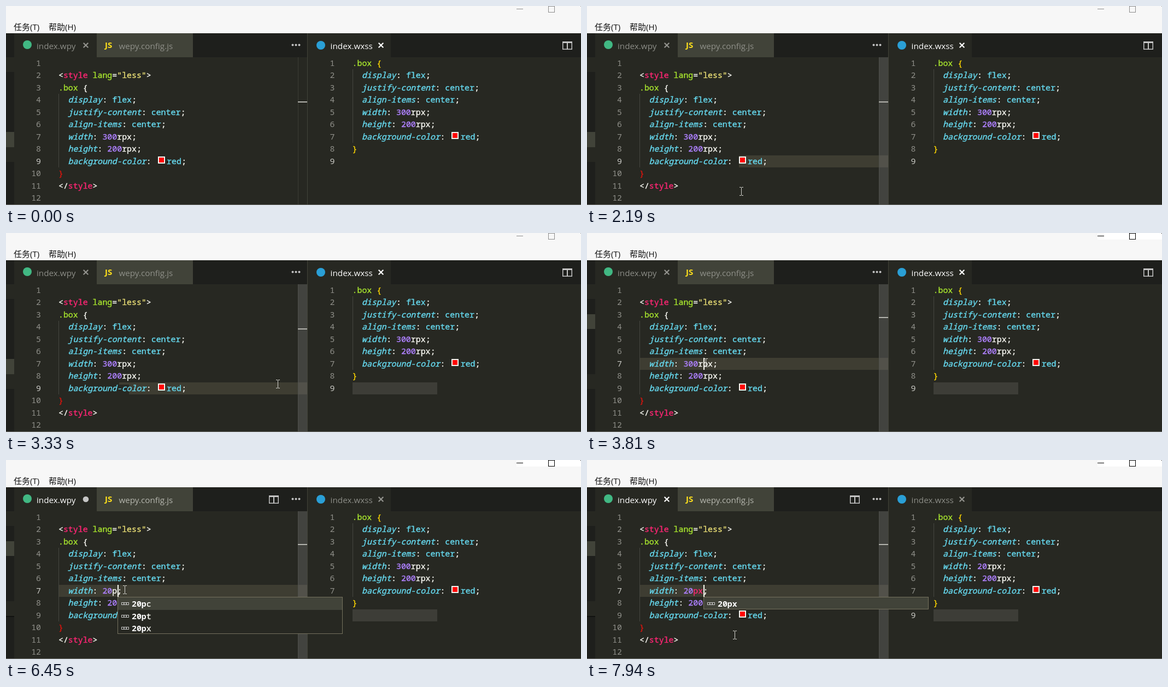
An HTML page with a canvas that plays this animation: 1052 by 365 pixels, repeating every 8000 ms.

```html
<!DOCTYPE html>
<html lang="zh">
<head>
<meta charset="utf-8">
<title>Editor</title>
<style>
html, body { margin: 0; width: 100%; height: 100%; overflow: hidden; background: #272822; }
canvas { display: block; }
</style>
</head>
<body>
<canvas id="stage" width="1052" height="365"></canvas>
<script>
const ctx = document.getElementById('stage').getContext('2d');
const LOOP = 8000;
const PITCH = 8.935, LINE = 22.5, FIRST = 105;
const LEFT = 96, RIGHT = 633.6;
const MONO = '14.89px "Noto Sans Mono", monospace';
const UI = '15.25px "Open Sans", "Noto Sans CJK SC", sans-serif';
const MENU = '15px "Open Sans", "Noto Sans CJK SC", sans-serif';
const BG = '#272822', DARK = '#1e1f1c', TAB = '#414339', HILITE = '#3e3d32';

// w plain, i property, c value, n number, p tag, g selector, y string, o brace, r bad brace
const COLORS = { w: '#f8f8f2', i: '#66d9ef', c: '#66d9ef', n: '#ae81ff', p: '#f92672',
  g: '#a6e22e', y: '#e6db74', o: '#ffd700', r: '#d8150f' };

const decl = (name, ...value) => ['w  ', 'i' + name, 'w: ', ...value, 'w;'];
const rules = (width, unit) => [
  decl('display', 'cflex'),
  decl('justify-content', 'ccenter'),
  decl('align-items', 'ccenter'),
  decl('width', 'n' + width, unit),
  decl('height', 'n200', 'wrpx'),
  decl('background-color', '#', 'cred')
];
const leftCode = (width, unit) => [
  [],
  ['w<', 'pstyle', 'w ', 'glang', 'w=', 'y"less"', 'w>'],
  ['g.box', 'w {'],
  ...rules(width, unit),
  ['r}'],
  ['w</', 'pstyle', 'w>'],
  []
];
const rightCode = width => [['g.box', 'o {'], ...rules(width, 'wrpx'), ['o}'], []];

const pointerPath = [
  [2070, 330, 345], [2190, 282, 340], [2330, 215, 288], [2430, 142, 260],
  [2560, 320, 285], [2700, 600, 285], [2870, 770, 194], [2990, 782, 284],
  [3200, 640, 300], [3420, 400, 262], [3640, 217, 238], [7410, 217, 238],
  [7560, 212, 262], [7740, 240, 300], [7940, 270, 321]
];

function rect(x, y, w, h, color) {
  ctx.fillStyle = color;
  ctx.fillRect(x, y, w, h);
}

function text(str, x, y, color, font = UI, align = 'left') {
  ctx.font = font;
  ctx.textAlign = align;
  ctx.fillStyle = color;
  ctx.fillText(str, x, y);
}

// A thin outline gives the code its medium weight.
function codeText(str, x, y, color, style = '') {
  text(str, x, y, color, style + MONO);
  ctx.strokeStyle = color;
  ctx.lineWidth = .4;
  ctx.strokeText(str, x, y);
}

function disc(x, y, r, color) {
  ctx.fillStyle = color;
  ctx.beginPath();
  ctx.arc(x, y, r, 0, 7);
  ctx.fill();
}

function cross(x, y, color) {
  ctx.strokeStyle = color;
  ctx.lineWidth = 2.2;
  ctx.beginPath();
  ctx.moveTo(x - 4.3, y - 4.3); ctx.lineTo(x + 4.3, y + 4.3);
  ctx.moveTo(x + 4.3, y - 4.3); ctx.lineTo(x - 4.3, y + 4.3);
  ctx.stroke();
}

function splitIcon(x) {
  ctx.strokeStyle = '#c5c5c5';
  ctx.lineWidth = 1.5;
  ctx.strokeRect(x + .75, 65.75, 16.5, 13.5);
  rect(x, 65, 18, 3, '#c5c5c5');
  rect(x + 8, 66, 2, 13, '#c5c5c5');
}

const lineTop = n => Math.round(FIRST + (n - 1) * LINE - LINE / 2);
const highlight = (n, x, end, color = HILITE) => rect(x, lineTop(n), end - x, 22, color);

function drawCode(lines, x0, gutter, active) {
  lines.forEach((tokens, row) => {
    const mid = FIRST + row * LINE, base = Math.round(mid + 4.8);
    text(row + 1, gutter, base, row + 1 === active ? '#c9c9c4' : '#90908a', MONO, 'right');
    let x = x0;
    for (const token of tokens) {
      const kind = token[0], str = token.slice(1);
      if (kind === '#') {
        const sx = Math.round(x + 3), sy = Math.round(mid) - 9;
        rect(sx, sy, 13, 13, '#f4f4ee');
        rect(sx + 2, sy + 2, 9, 9, '#ff0000');
        x += 19.4;
        continue;
      }
      const italic = kind === 'i';
      codeText(str, italic ? x - .4 : x, base, COLORS[kind], italic ? 'italic ' : '');
      x += str.length * PITCH;
    }
  });
}

function drawWindow(t) {
  const focused = t >= 3730;
  rect(0, 0, 1052, 50, '#f7f7f7');
  if (focused) rect(934, 0, 118, 12, '#fff');
  const ink = focused ? '#000' : '#8c8c8c';
  rect(934, 5, 12, 1, ink);
  ctx.strokeStyle = ink;
  ctx.lineWidth = 1;
  ctx.strokeRect(992.5, .5, 11, 11);
  rect(1051, 0, 1, 1, ink);
  text('任务(T)', 14, 44, '#111', MENU);
  text('帮助(H)', 78, 44, '#111', MENU);
}

function drawSidebar(t) {
  rect(0, 50, 15, 315, DARK);
  rect(0, 94, 15, 27, BG);
  rect(0, 259, 15, 27, BG);
  rect(0, t < 3810 ? 231 : 149, 15, t < 3810 ? 28 : 27, TAB);
  if (t >= 3840) rect(0, 286, 15, 2, '#111210');
}

function drawTabs(t) {
  const leftActive = t >= 3840;
  const unsaved = t >= 5310 && t < 7220;
  const bright = '#fff', dim = '#8c8d87';
  rect(15, 50, 1037, 44, DARK);
  rect(15, 50, 151, 44, BG);
  rect(166, 50, 176, 44, TAB);
  rect(552, 50, 152, 44, BG);

  disc(39, 71, 8, '#41b883');
  text('index.wpy', 56, 79, leftActive ? bright : dim);
  if (unsaved) disc(146, 72, 5.3, '#c5c5c5');
  else cross(146, 72, leftActive ? bright : '#92928d');
  text('JS', 181, 77, '#ffe01b', 'bold 15px "Open Sans", sans-serif');
  text('wepy.config.js', 206.4, 79, leftActive ? '#b5b6ae' : '#8f9089');
  for (const x of [524.5, 530.5, 536.5]) disc(x, 71.5, 2, '#c5c5c5');

  disc(576, 72, 8, '#2a9fd6');
  text('index.wxss', 593.6, 79, leftActive ? dim : bright);
  cross(686, 72, leftActive ? '#92928d' : bright);
  splitIcon(leftActive ? 481 : 1018);
}

function leftWidth(t) {
  if (t < 5310) return ['300', 'wrpx'];
  if (t < 5390) return ['2', 'w'];
  if (t < 6420) return ['20', 'w'];
  return t < 6540 ? ['20', 'wp'] : ['20', 'ppx'];
}

function drawCaret(t) {
  const off = [[4570, 5060], [5960, 6420], [7040, 7540]];
  if (t < 3810 || off.some(([a, b]) => t >= a && t < b)) return;
  const col = t < 3990 ? 13 : t < 5310 ? 15 : t < 5390 ? 10 : t < 6420 ? 11 : t < 6540 ? 12 : 13;
  rect(Math.round(LEFT + .4 + col * PITCH), 229, 2, 22, '#f8f8f0');
}

function drawRuler(t, selected) {
  rect(534, 94, 1, 270, '#3b3c35');
  const shown = Math.min(1, Math.max(0, Math.ceil((t - 1029) / 57) / 4));
  rect(534, 94, 17, 270, `rgba(121,121,121,${.33 * shown})`);
  rect(534, t < 3810 ? 175 : 154, 17, 2, '#b4b4ae');
  if (selected) rect(539, 156, 7, 9, '#a0a09b');
  rect(551, 50, 1, 314, '#414339');
}

function drawPopup(t) {
  if (t < 6450) return;
  const narrowed = t >= 6570;
  const x = narrowed ? 213 : 204;
  const items = narrowed ? ['20px'] : ['20pc', '20pt', '20px'];
  const matched = narrowed ? 4 : 3;
  const h = narrowed ? 23 : 68;
  rect(x, 251, 412, h, '#75715e');
  rect(x + 1, 252, 410, h - 2, BG);
  rect(x + 1, 252, 410, narrowed ? 21 : 23, TAB);
  items.forEach((item, i) => {
    const mid = 264 + i * LINE, base = Math.round(mid + 5);
    ctx.strokeStyle = '#c5c5c5';
    ctx.lineWidth = 1;
    for (let k = 0; k < 3; k++) ctx.strokeRect(x + 7.5 + k * 4.5, Math.round(mid) - 2.5, 4, 4);
    text(item.slice(0, matched), x + 26, base, '#fff', 'bold ' + MONO);
    codeText(item.slice(matched), x + 26 + matched * PITCH, base, '#f8f8f2');
  });
}

function drawPointer(t) {
  if (t < pointerPath[0][0]) return;
  let i = pointerPath.findIndex(p => p[0] > t);
  if (i < 0) i = pointerPath.length;
  const a = pointerPath[i - 1], b = pointerPath[i] || a;
  const k = a === b ? 0 : (t - a[0]) / (b[0] - a[0]);
  const x = Math.round(a[1] + (b[1] - a[1]) * k);
  const y = Math.round(a[2] + (b[2] - a[2]) * k);
  const color = '#d6d6d0';
  rect(x, y - 7, 1, 14, color);
  for (const edge of [y - 8, y + 7]) {
    rect(x - 3, edge, 3, 1, color);
    rect(x + 1, edge, 3, 1, color);
  }
}

function drawEditors(t) {
  const selected = t >= 3990 && t < 5310;
  rect(15, 94, 1037, 271, BG);
  if (t >= 2130 && t < 3810) {
    highlight(9, t < 2330 ? 278 : 225, 551);
    if (t >= 2330) rect(207, 274, 38, 4, HILITE);
  }
  if (t >= 3810 && !selected) highlight(7, 97, 551);
  if (t >= 2700) highlight(9, 634, t < 2990 ? 774 : 789, '#3d3d37');
  if (selected) rect(176, 229, 55, 22, '#54546a');
  rect(96, 161, 1, 135, '#464741');
  rect(634, 116, 1, 135, '#464741');
  drawCode(leftCode(...leftWidth(t)), LEFT, 64, t < 3810 ? 9 : 7);
  drawCode(rightCode(t < 7480 ? '300' : '20'), RIGHT, 601.5, 9);
  drawRuler(t, selected);
  drawCaret(t);
  drawPopup(t);
}

function draw(t) {
  drawEditors(t);
  drawTabs(t);
  rect(551, 50, 1, 44, '#414339');
  drawSidebar(t);
  drawWindow(t);
  rect(0, 364, 1052, 1, '#6a6a66');
  drawPointer(t);
}

const start = performance.now();
function tick() {
  draw((performance.now() - start) % LOOP);
  requestAnimationFrame(tick);
}
tick();
</script>
</body>
</html>
```
